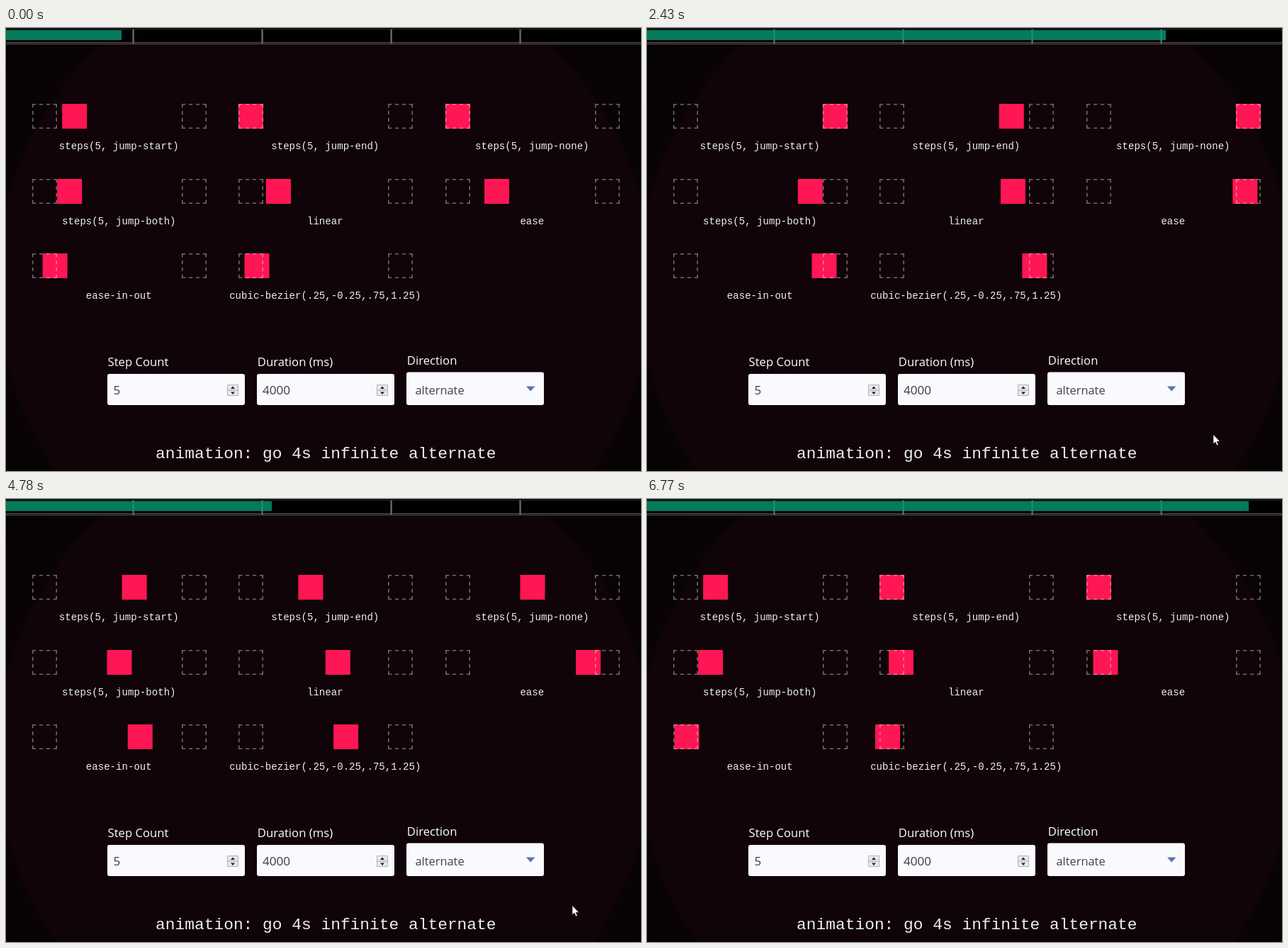
Animation, 896 px wide and 625 px high, one loop 6.87 s. Source, as an HTML page:

```html
<!DOCTYPE html>
<html lang="en">
<head>
<meta charset="utf-8">
<title>Easing comparison</title>
<style>
  html, body { margin: 0; width: 100%; height: 100%; overflow: hidden; background: #070204; }
  svg { display: block; width: 896px; height: 625px; }
  .mono { font-family: "Liberation Mono", monospace; fill: #f0eeef; text-anchor: middle; }
  .label { font-size: 14.08px; }
  .summary { font-size: 22.88px; }
  .form { font: 16.7px "Open Sans", sans-serif; fill: #fff; }
  .value { font-size: 17.1px; fill: #3c3c3c; }
  .choice { font-size: 16.4px; fill: #444; }
  .field { fill: #f9f9fe; }
  .box { fill: #ff1654; }
  .slot { fill: none; stroke: #fff; stroke-opacity: .4; stroke-width: 1.6; stroke-dasharray: 5.28 4.63; }
</style>
</head>
<body>
<svg viewBox="0 0 896 625">
  <defs>
    <radialGradient id="shade" gradientUnits="userSpaceOnUse" cx="449.5" cy="360" r="570">
      <stop offset=".81" stop-color="#100408"/>
      <stop offset=".81" stop-color="#090305"/>
      <stop offset="1" stop-color="#050203"/>
    </radialGradient>
    <path id="slot" class="slot" d="M0 .8H35M0 34.2H35M.8 0V35M34.2 0V35"/>
    <g id="spinner">
      <path d="M.5 .5H15.5V15.5H.5Z" fill="#e9e9ec" stroke="#b4b4b8"/>
      <path d="M0 8H16" stroke="#a8a8ac"/>
      <path d="M5 6L8 2.5L11 6ZM5 10.5L8 14L11 10.5Z" fill="#222"/>
    </g>
  </defs>
  <rect width="896" height="625" fill="url(#shade)"/>

  <rect width="896" height="23" fill="#020102"/>
  <rect y="1" width="896" height="1" fill="#2c2a2c"/>
  <path id="ticks" stroke="#6a6769" stroke-width="2.4"/>
  <rect id="bar" y="3" height="14" fill="#05966f" fill-opacity=".82"/>
  <path d="M0 20.5H896M0 22.5H896" stroke="#5c595b"/>

  <g id="demos"></g>

  <g class="form">
    <text x="143.5" y="477">Step Count</text>
    <text x="354.8" y="477">Duration (ms)</text>
    <text x="565.8" y="475">Direction</text>
    <rect class="field" x="143" y="488" width="194" height="44" rx="3"/>
    <rect class="field" x="354" y="488" width="194" height="44" rx="3"/>
    <rect class="field" x="565" y="485.5" width="194" height="46.5" rx="3"/>
    <text class="value" x="151.5" y="517">5</text>
    <text class="value" x="362" y="517">4000</text>
    <text class="choice" x="577.5" y="516.5">alternate</text>
    <use href="#spinner" x="312" y="503"/>
    <use href="#spinner" x="523" y="503"/>
    <path d="M734 505.5H746.5L740.2 512.5Z" fill="#5f70b5"/>
  </g>

  <text class="mono summary" x="451.3" y="607">animation: go 4s infinite alternate</text>
  <path id="cursor" d="M0 0V13.4L3 10.6L5.2 15.4L7.3 14.5L5.2 9.8H9.5Z" fill="#fff" stroke="#000" stroke-width=".6"/>
</svg>
<script>
const LOOP = 6870, CYCLE = 4000, TRAVEL = 211, SIZE = 35;
const byId = id => document.getElementById(id);
const easings = [
  'steps(5, jump-start)', 'steps(5, jump-end)', 'steps(5, jump-none)',
  'steps(5, jump-both)', 'linear', 'ease',
  'ease-in-out', 'cubic-bezier(.25,-0.25,.75,1.25)'
];

byId('ticks').setAttribute('d', [1, 2, 3, 4].map(i => `M${182 * i - 2.4} 2V22`).join(''));

byId('demos').innerHTML = easings.map((easing, i) => {
  const x = Math.round(37 + 291.4 * (i % 3)), y = Math.round(107.2 + 105.5 * Math.floor(i / 3));
  return `<g transform="translate(${x} ${y})">
    <rect class="box" width="${SIZE}" height="${SIZE}"/>
    <use href="#slot"/><use href="#slot" x="${TRAVEL}"/>
    <text class="mono label" x="122.3" y="64.3">${easing}</text></g>`;
}).join('');

const players = [...document.querySelectorAll('.box')].map((box, i) => {
  const player = box.animate(
    { transform: ['translateX(0px)', `translateX(${TRAVEL}px)`] },
    { duration: CYCLE, iterations: Infinity, direction: 'alternate', easing: easings[i] });
  player.pause();
  return player;
});

// The picture refreshes at uneven ticks: [end of run, number of ticks in it]
const ticks = [0];
for (const [end, count] of [[130, 1], [1060, 7], [1320, 2], [2160, 6], [2290, 1], [2430, 1],
  [2550, 1], [3120, 4], [3250, 1], [3370, 1], [4070, 5], [4200, 1], [4350, 1], [4510, 1],
  [5450, 7], [5600, 1], [6640, 8], [6770, 1]]) {
  const start = ticks[ticks.length - 1];
  for (let i = 1; i <= count; i++) ticks.push(start + Math.round((end - start) * i / count / 10) * 10);
}

// Loop time against the running time of the demos
const pace = [[0, 739], [1320, 2087], [2430, 3241], [3120, 3940], [3250, 4089],
  [4070, 4933], [5450, 6370], [6640, 7624], [6770, 7752]];

function demoTime(t) {
  const i = pace.findIndex(([time], n) => n && t <= time);
  const [t0, d0] = pace[i - 1], [t1, d1] = pace[i];
  return d0 + (d1 - d0) * (t - t0) / (t1 - t0);
}

function draw(now) {
  const t = ticks.findLast(tick => tick <= now % LOOP + .01);
  const time = demoTime(t);
  for (const player of players) player.currentTime = time;
  byId('bar').setAttribute('width', Math.max(0, Math.round(910 * (time % CYCLE) / CYCLE - 5)));
  byId('cursor').style.display = t >= 1740 && t < 6250 ? '' : 'none';
  byId('cursor').setAttribute('transform', `translate(799 ${t < 6110 ? 573.5 : 597.5})`);
}

let origin;
function tick(now) {
  origin ??= now;
  draw(now - origin);
  requestAnimationFrame(tick);
}
draw(0);
requestAnimationFrame(tick);
</script>
</body>
</html>
```
